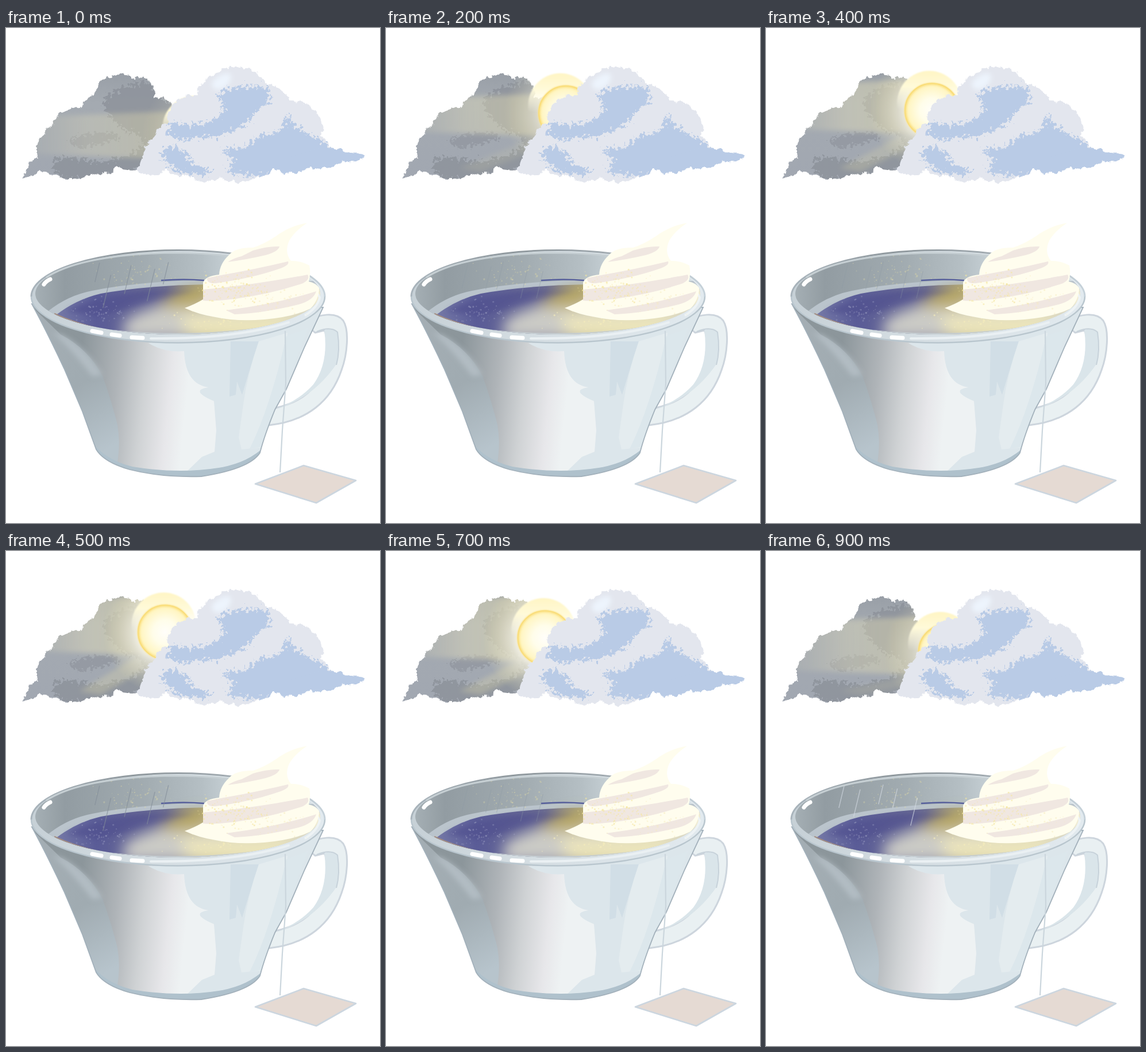
Animation, 651 px wide and 861 px high, one loop 1000 ms. Source, as an HTML page:

```html
<!DOCTYPE html>
<html lang="en">
<head>
<meta charset="utf-8">
<title>Weather in a teacup</title>
<style>
html, body { margin: 0; width: 100%; height: 100%; overflow: hidden; background: #fff; }
svg { display: block; width: 100vw; height: 100vh; }
</style>
</head>
<body>
<svg viewBox="0 0 651 861" preserveAspectRatio="none">
<defs>
  <filter id="edge" x="-5%" y="-10%" width="110%" height="120%" color-interpolation-filters="sRGB">
    <feTurbulence type="fractalNoise" baseFrequency=".1" numOctaves="3" seed="4"/>
    <feDisplacementMap in="SourceGraphic" scale="11" xChannelSelector="R" yChannelSelector="G"/>
  </filter>
  <filter id="sponge" x="-10%" y="-10%" width="120%" height="120%" color-interpolation-filters="sRGB">
    <feTurbulence type="fractalNoise" baseFrequency=".17" numOctaves="4" seed="7"/>
    <feDisplacementMap in="SourceGraphic" scale="30" xChannelSelector="R" yChannelSelector="G"/>
  </filter>
  <filter id="b1"><feGaussianBlur stdDeviation="1.3"/></filter>
  <filter id="b4" x="-30%" y="-30%" width="160%" height="160%"><feGaussianBlur stdDeviation="4"/></filter>
  <filter id="b12" x="-50%" y="-50%" width="200%" height="200%"><feGaussianBlur stdDeviation="12"/></filter>

  <linearGradient id="storm" x1="0" y1="0" x2="0" y2="1">
    <stop offset="0" stop-color="#979da5"/><stop offset=".3" stop-color="#a4aab1"/><stop offset="1" stop-color="#a1a7b1"/>
  </linearGradient>
  <linearGradient id="beam" gradientUnits="userSpaceOnUse" x1="60" y1="0" x2="290" y2="0">
    <stop offset="0" stop-color="#dad6ba" stop-opacity=".2"/><stop offset=".35" stop-color="#dcd8bc" stop-opacity=".6"/>
    <stop offset="1" stop-color="#d9d2a8" stop-opacity=".75"/>
  </linearGradient>
  <radialGradient id="warm">
    <stop offset=".4" stop-color="#fffef6"/><stop offset=".55" stop-color="#f6f4e6" stop-opacity=".7"/>
    <stop offset="1" stop-color="#e6dfb0" stop-opacity="0"/>
  </radialGradient>
  <linearGradient id="halo" x1="0" y1="0" x2="0" y2="1">
    <stop offset="0" stop-color="#fff5c4"/><stop offset=".25" stop-color="#fffad9"/><stop offset=".6" stop-color="#fffdf0" stop-opacity="0"/>
  </linearGradient>
  <radialGradient id="disc">
    <stop offset="0" stop-color="#fffefa"/><stop offset=".45" stop-color="#fffdea"/>
    <stop offset=".85" stop-color="#fff6c6"/><stop offset="1" stop-color="#feeea4"/>
  </radialGradient>
  <linearGradient id="wall">
    <stop offset="0" stop-color="#a9b3b8"/><stop offset=".12" stop-color="#929ca2"/><stop offset=".38" stop-color="#a1abb0"/>
    <stop offset=".58" stop-color="#b5bfc4"/><stop offset=".72" stop-color="#ced8dd"/><stop offset="1" stop-color="#dce5ea"/>
  </linearGradient>
  <linearGradient id="rim">
    <stop offset="0" stop-color="#c6d0d6"/><stop offset=".35" stop-color="#d3dce1"/><stop offset="1" stop-color="#e2eaef"/>
  </linearGradient>
  <linearGradient id="rimLine">
    <stop offset="0" stop-color="#a9b4bc"/><stop offset=".35" stop-color="#8f989d"/><stop offset=".65" stop-color="#a1aab0"/>
    <stop offset="1" stop-color="#c6d2da"/>
  </linearGradient>
  <linearGradient id="tea" gradientUnits="userSpaceOnUse" x1="90" y1="0" x2="540" y2="0">
    <stop offset="0" stop-color="#7478a6"/><stop offset=".15" stop-color="#5a5c97"/><stop offset=".42" stop-color="#696a92"/>
    <stop offset=".58" stop-color="#b8ae78"/><stop offset=".8" stop-color="#e6ddb0"/><stop offset="1" stop-color="#f1ecd2"/>
  </linearGradient>
  <linearGradient id="body" gradientUnits="userSpaceOnUse" x1="125" y1="620" x2="315" y2="640">
    <stop offset="0" stop-color="#8c969b"/><stop offset=".35" stop-color="#afb4b8"/><stop offset=".6" stop-color="#cfd2d4"/>
    <stop offset=".84" stop-color="#e7e7ea"/><stop offset="1" stop-color="#eef2f3"/>
  </linearGradient>
  <linearGradient id="side" gradientUnits="userSpaceOnUse" x1="70" y1="540" x2="180" y2="730">
    <stop offset="0" stop-color="#a3adb3"/><stop offset=".45" stop-color="#a0abb1"/><stop offset="1" stop-color="#b7c4cc"/>
  </linearGradient>

  <path id="grayShape" data-puff="33,263 57,228 66,188 85,171 104,147 131,143 157,118 180,88 224,90 250,92 260,124 290,134 290,165 243,244 196,243 150,255 90,257 62,247"/>
  <path id="blueShape" data-puff="230,250 240,225 262,188 283,165 288,139 333,118 366,80 420,72 453,98 495,127 545,153 549,190 565,210 590,218 625,225 585,232 530,243 468,246 440,259 375,262 315,257 280,248"/>
  <path id="bodyShape" d="M45 480Q72 530 101 592L133 667 157 733Q170 755 215 768 270 782 340 780 424 767 442 739 450 708 468 664L488 628 520 554 552 486Z"/>
  <mask id="grayMask"><use href="#grayShape" x="-2" y="-2" fill="#fff" filter="url(#edge)"/></mask>
  <mask id="blueMask"><use href="#blueShape" x="-1" y="-1" fill="#fff" filter="url(#edge)"/></mask>
  <clipPath id="inside"><ellipse cx="299" cy="462" rx="248" ry="71"/></clipPath>
  <clipPath id="bodyClip"><use href="#bodyShape"/></clipPath>
</defs>

<!-- sky -->
<g mask="url(#grayMask)">
  <rect x="20" y="70" width="290" height="200" fill="url(#storm)"/>
  <g fill="#8c919a" fill-opacity=".8" filter="url(#sponge)">
    <path data-soft="165,118 250,86 262,122 300,130 285,180 240,212 234,184 206,180 174,148"/>
    <path data-soft="78,230 102,222 170,236 225,217 246,198 246,250 150,264 90,264"/>
    <path data-soft="105,194 160,180 208,188 170,200 122,210" fill-opacity=".6"/>
  </g>
  <path id="beamShape" fill="url(#beam)" filter="url(#b4)"/>
  <path id="ray" fill="#e3dcae" filter="url(#b4)"/>
  <circle id="shine" r="108" fill="url(#warm)"/>
</g>
<circle id="glow" r="56" fill="url(#halo)" filter="url(#b1)"/>
<g id="sun">
  <circle r="47" fill="url(#disc)"/>
  <circle r="46.5" fill="none" stroke="#fbe28a" stroke-width="4" filter="url(#b1)"/>
  <circle r="47" fill="none" stroke="#f9dc76" stroke-width="1.6"/>
</g>
<g mask="url(#blueMask)">
  <rect x="200" y="60" width="440" height="215" fill="#e3e6ee"/>
  <path data-soft="354,98 374,80 394,78 388,100 368,110" fill="#edf4fd" filter="url(#b4)"/>
  <g fill="#b9cbe6" filter="url(#sponge)">
    <path data-soft="364,112 415,100 460,103 458,132 430,148 424,166 365,192 330,188 310,198 278,187 290,160 330,172 374,156 382,138"/>
    <path data-soft="490,146 478,182 440,184 418,211 366,209 406,234 376,250 440,260 530,260 640,246 640,206 560,206 540,190 505,175"/>
    <path data-soft="264,216 292,203 322,222 312,232 370,252 310,256 284,238"/>
  </g>
  <path d="M470 246L490 225 550 208 640 212V236L530 246Z" fill="#b9cbe6"/>
</g>

<!-- handle -->
<path d="M518 512C545 497 575 493 587 509C598 526 594 568 584 595C566 648 525 684 457 691L468 661C520 650 548 622 555 580C559 555 560 535 554 526L538 530Z" fill="#e9f0f2" stroke="#cdd5dd" stroke-width="3" stroke-linejoin="round"/>
<path d="M554 526Q569 519 577 528Q581 552 577 582Q562 604 545 620Q512 651 468 664Q510 648 535 620Q562 582 554 526Z" fill="#dae5ea"/>
<path d="M541 528Q565 518 577 529Q582 560 575 586" fill="none" stroke="#c7d2da" stroke-width="2"/>

<!-- cup body -->
<use href="#bodyShape" fill="url(#body)"/>
<g clip-path="url(#bodyClip)">
  <path d="M30 470L95 533Q143 558 168 605Q184 650 194 690Q201 730 190 775H100Z" fill="url(#side)"/>
  <path d="M82 530Q112 556 150 606L168 604Q142 558 97 533Z" fill="#b9c4ca" fill-opacity=".7" filter="url(#b4)"/>
  <path d="M248 548Q275 565 310 562 312 620 353 625 318 630 362 649L366 700 363 737 341 746 314 772 385 772 445 745 560 480 400 540Z" fill="#dce6eb"/>
  <path d="M391 545L389 641 400 638 402 615 411 638Q424 594 440 545Z" fill="#d1dee6"/>
  <path d="M440 545Q420 602 413 655L405 712 410 733 442 730 485 620 490 530Z" fill="#e4ecef"/>
  <path d="M488 536L526 522 490 615 448 728 424 732Q460 660 488 536Z" fill="#dce7ec"/>
  <path d="M145 714Q168 750 220 763Q300 776 370 765Q420 757 450 728V790H140Z" fill="#afc1cc"/>
</g>
<use href="#bodyShape" fill="none" stroke="#a3b1bb" stroke-width="1.8"/>

<!-- inside -->
<ellipse cx="299.5" cy="467" rx="256" ry="80.5" fill="url(#rim)"/>
<g clip-path="url(#inside)">
  <rect x="40" y="385" width="520" height="155" fill="url(#wall)"/>
  <path d="M74 492Q108 465 150 457Q230 441 350 438L560 440V540H150Z" fill="#bac4cc"/>
  <path d="M86 500Q122 472 165 462Q240 448 350 446L560 450V540H150Z" fill="url(#tea)"/>
  <path d="M105 492Q155 468 235 458Q290 453 330 460Q270 474 214 488L160 502Z" fill="#4f5190" filter="url(#b4)" fill-opacity=".65"/>
  <g filter="url(#b12)">
    <path d="M205 512Q240 480 340 474L540 490 500 540H205Z" fill="#cbcbc6"/>
    <path d="M262 482Q320 446 352 455L345 484 295 488Z" fill="#b9a85e"/>
    <path d="M300 500L520 495 470 540 320 535Z" fill="#ece5bb"/>
  </g>
  <path d="M270 439Q310 436 345 439" fill="none" stroke="#565f9b" stroke-width="2.5"/>
  <path d="M84 497Q120 514 170 525" fill="none" stroke="#a48d80" stroke-width="3"/>
  <path d="M170 525Q300 540 430 524" fill="none" stroke="#c6ced2" stroke-width="3"/>
  <g id="dots"></g>
  <g id="rain" stroke-width="1.5" stroke-linecap="round"></g>
</g>

<!-- rim -->
<g fill="none">
  <path d="M44 467A255.5 80.5 0 0 0 555 467" stroke="#b9c6ce" stroke-width="2.5"/>
  <path d="M44 467A255.5 80.5 0 0 1 555 467" stroke="url(#rimLine)" stroke-width="3"/>
  <path d="M70 434Q130 395 285 391Q380 391 440 405" stroke="#c6cfd3" stroke-width="3"/>
  <g stroke="#fff" stroke-width="7" stroke-linecap="round">
    <path d="M66 446Q70 440 77 437M150 527L166 530M184 533L198 535M219 538L238 539"/>
    <path d="M252 540Q400 541 492 512" stroke="#eaf0f3" stroke-width="4"/>
  </g>
  <path d="M528 448Q543 459 546 469Q541 488 520 500" stroke="#eef3f5" stroke-width="4"/>
</g>

<!-- cream -->
<path d="M524 339C502 343 485 351 470 362Q449 376 430 382C404 382 394 388 388 395Q372 410 371 429Q347 431 343 443L343 472Q328 481 311 487Q334 498 365 503Q402 511 450 507Q502 502 530 488Q545 472 545 452Q539 443 527 441Q531 426 528 413Q514 405 496 405Q484 390 493 370Q502 354 524 339Z" fill="#fffdee"/>
<g fill="#f0e7e1">
  <path d="M430 387Q456 379 476 380Q474 389 452 395Q418 403 386 407Q397 400 410 397Z"/>
  <path d="M374 430Q432 420 491 406Q494 412 478 418Q430 435 365 444Q349 445 350 435Z"/>
  <path d="M343 455Q432 447 525 429Q530 437 517 444Q465 462 400 471Q360 476 343 474Z"/>
  <path d="M383 491Q470 480 540 458Q535 474 509 481Q448 496 398 498Z"/>
</g>
<g id="sparks"></g>

<!-- tag -->
<path d="M486 527L487 618 481 700 477 773" fill="none" stroke="#cbd6dd" stroke-width="2.2"/>
<path d="M434 793L518 761 609 787 540 826Z" fill="#e5dad3" stroke="#ccd6df" stroke-width="2.6" stroke-linejoin="round"/>
</svg>

<script>
const $ = id => document.getElementById(id);
const set = (id, attrs) => { for (const k in attrs) $(id).setAttribute(k, attrs[k]); };
const points = text => text.split(' ').map(s => s.split(',').map(Number));

// Key points joined by outward arcs, like the edge of a cloud.
function puff(p) {
  return 'M' + p[0] + p.map((a, i) => {
    const b = p[(i + 1) % p.length], r = Math.hypot(b[0] - a[0], b[1] - a[1]);
    return `A${r} ${r} 0 0 1 ${b}`;
  }).join('') + 'Z';
}

// Closed curve through the midpoints of the key points.
function soft(p) {
  const mid = (a, b) => `${(a[0] + b[0]) / 2} ${(a[1] + b[1]) / 2}`;
  return 'M' + mid(p[p.length - 1], p[0]) +
    p.map((a, i) => `Q${a} ${mid(a, p[(i + 1) % p.length])}`).join('') + 'Z';
}
document.querySelectorAll('[data-puff]').forEach(el => el.setAttribute('d', puff(points(el.dataset.puff))));
document.querySelectorAll('[data-soft]').forEach(el => el.setAttribute('d', soft(points(el.dataset.soft))));

let seed = 11;
const rnd = () => (seed = seed * 16807 % 2147483647) / 2147483647;

function scatter(id, n, cx, cy, w, h, color, alpha) {
  for (let i = 0; i < n; i++) {
    const x = cx + (rnd() + rnd() - 1) * w, y = cy + (rnd() + rnd() - 1) * h;
    $(id).innerHTML += `<circle cx="${x}" cy="${y}" r="${.5 + rnd() * 1.2}"
      fill="${color}" fill-opacity="${alpha * (.4 + rnd() * .6)}"/>`;
  }
}
scatter('dots', 70, 225, 425, 75, 38, '#d8d4a8', .5);
scatter('dots', 70, 165, 492, 70, 28, '#a3a6c6', .55);
scatter('dots', 70, 370, 505, 110, 24, '#f8efbb', .7);
scatter('sparks', 160, 400, 455, 75, 36, '#f5e7a2', .75);
scatter('sparks', 50, 470, 475, 65, 25, '#f7ecc0', .6);

// Three showers of slanted drops: light, faint, dark.
const showers = ['#d5dde499', '#8c98a44d', '#828d9899'].map((color, k) => {
  let s = '';
  for (let i = 0; i < 5; i++) {
    const x = 130 + 10 * k + 32 * i + rnd() * 14, y = 395 + rnd() * 35, n = 32 + rnd() * 26;
    s += `<path d="M${x} ${y}l${-n * .24} ${n}" stroke="${color}"/>`;
  }
  return s;
});

const PEAK = 6; // step at which the sun is fully out

function draw(i) {
  const rise = PEAK - i, fall = i ? i - PEAK : 4;
  const away = fall < 0 ? 12 * rise : 11 * fall + .55 * fall ** 3;
  const x = 265 + away, y = 139 + (fall < 0 ? 2.2 * rise : 12 * fall);
  const light = 1 - away / 80, edge = Math.min(x, 310);

  set('sun', { transform: `translate(${x} ${y})` });
  set('glow', { cx: x - away * .2, cy: y - 13 });
  set('shine', { cx: x, cy: y, opacity: .3 + .7 * light });
  set('beamShape', {
    d: `M45 ${75 + away}L${edge} ${65 + away}V${y + 42}L45 ${y + 32}Z`,
    opacity: .6 + .3 * light
  });
  set('ray', { d: `M${x - 40} ${y + 36}l30 14L165 250L128 244Z`, opacity: .35 * light });
  $('rain').innerHTML = showers[(i < 3 ? i + 2 : i) % 3];
}

const start = performance.now();
let shown = 0;
function tick(now) {
  const i = Math.floor(Math.max(0, now - start) % 1000 / 100);
  if (i !== shown) draw(shown = i);
  requestAnimationFrame(tick);
}
draw(0);
requestAnimationFrame(tick);
</script>
</body>
</html>
```
